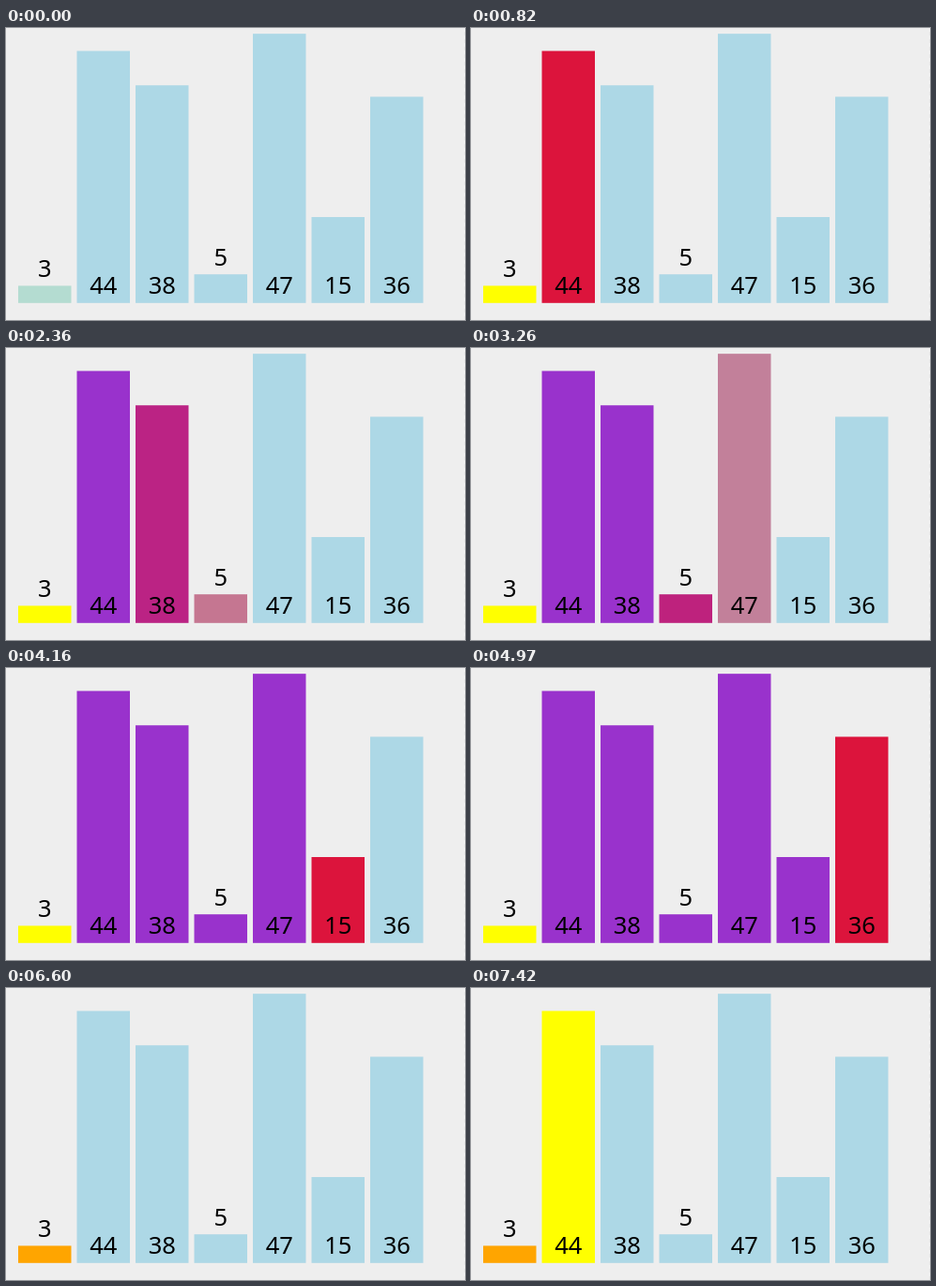
Recreate the animation shown at these times as an HTML page. Size 489 by 312 pixels, loop 8000 ms.

```html
<!DOCTYPE html>
<html lang="en">
<head>
<meta charset="utf-8">
<title>Selection sort</title>
<style>
  html, body { margin: 0; width: 100%; height: 100%; overflow: hidden; background: #eee; }
  svg { display: block; width: 489px; height: 312px; }
  text { font: 25.5px "Noto Sans", "Open Sans", sans-serif; text-anchor: middle; fill: #000; }
</style>
</head>
<body>
<svg id="stage" viewBox="0 0 489 312">
  <path d="M488.5 0V312" stroke="#f7f7f7" stroke-dasharray="4 4"/>
</svg>
<script>
const LOOP = 8000, TICK = 80;
const BASE = 293.8, UNIT = 6.12, PITCH = 62.5, WIDTH = 56.5, LEFT = 13;
const values = [3, 44, 38, 5, 47, 15, 36];

const blue = [173, 216, 230], yellow = [255, 255, 0], red = [220, 20, 60],
      purple = [153, 50, 204], orange = [255, 165, 0];

// start time, blend reached at each tick, new colour per bar
const steps = [
  [0, [.09, .7, 1], { 0: yellow }],
  [740, [.5, 1], { 1: red }],
  [1710, [.82, 1], { 1: purple, 2: red }],
  [2360, [.5, 1], { 2: purple, 3: red }],
  [3260, [.45, 1], { 3: purple, 4: red }],
  [4000, [.2, .8, 1], { 4: purple, 5: red }],
  [4890, [.6, 1], { 5: purple, 6: red }],
  [5620, [.5, 1], { 6: purple }],
  [6440, [.22, .83, 1], { 0: orange, 1: blue, 2: blue, 3: blue, 4: blue, 5: blue, 6: blue }],
  [7260, [.2, .8, 1], { 1: yellow }]
];

const stage = document.getElementById("stage");

function add(tag, attrs) {
  const el = document.createElementNS("http://www.w3.org/2000/svg", tag);
  for (const key in attrs) el.setAttribute(key, attrs[key]);
  return stage.appendChild(el);
}

const bars = values.map((value, i) => {
  const x = LEFT + i * PITCH, height = value * UNIT, top = BASE - height;
  const bar = add("rect", { x, y: top, width: WIDTH, height });
  // short bars carry their label above
  const floor = value < 10 ? top : BASE;
  add("text", { x: x + WIDTH / 2, y: floor - 9.7 }).textContent = value;
  return bar;
});

const mix = (a, b, k) => a.map((v, i) => v + (b[i] - v) * k);

function colorsAt(time) {
  const colors = values.map(() => blue);
  for (const [start, blends, changes] of steps) {
    if (time < start) break;
    const tick = Math.min(Math.floor((time - start) / TICK), blends.length - 1);
    for (const i in changes) colors[i] = mix(colors[i], changes[i], blends[tick]);
  }
  return colors;
}

function draw(time) {
  colorsAt(time).forEach((c, i) => bars[i].setAttribute("fill", `rgb(${c.map(Math.round)})`));
}

const origin = performance.now();
function frame() {
  draw((performance.now() - origin) % LOOP);
  requestAnimationFrame(frame);
}
frame();
</script>
</body>
</html>
```
